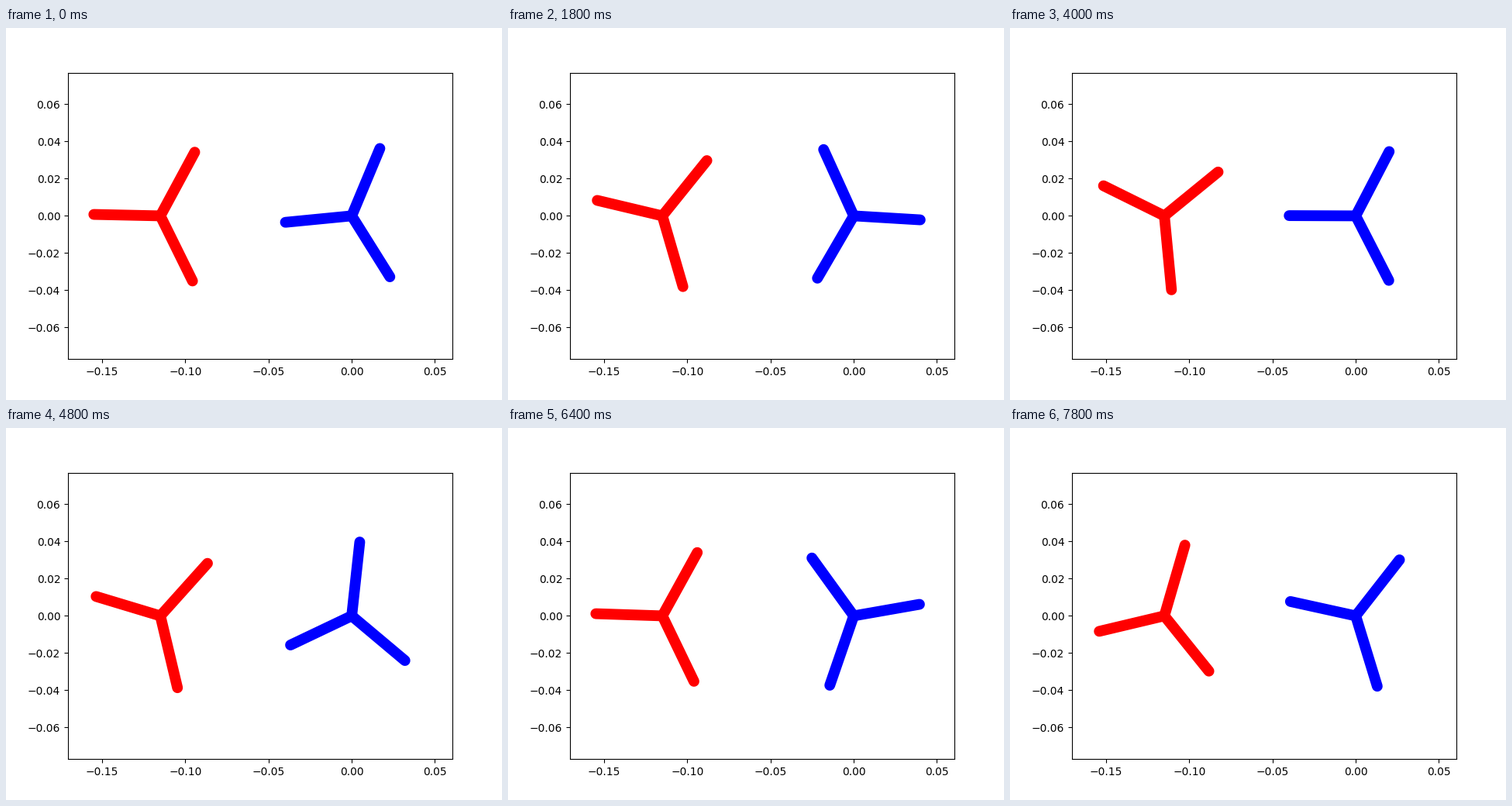
A matplotlib script that plays this animation: 640x480 px, repeating every 8 s.

```python
import numpy as np
import matplotlib.pyplot as plt
from matplotlib.animation import FuncAnimation

FRAMES = 40
INTERVAL = 200
ARM = 0.04
RED_X = -0.115

# Angle of the pushed rotor in degrees, one knot every STEP frames.
STEP = 3
KNOTS = np.array([58.9, 59.1, 54.8, 48.0, 41.5, 35.1, 33.6,
                  38.0, 44.9, 51.15, 56.0, 59.5, 63.6, 72.0])
SLOPES = np.gradient(KNOTS)


def red_angle(k):
    """Cubic Hermite curve through the knots."""
    i = min(k // STEP, len(KNOTS) - 2)
    s = k / STEP - i
    return ((1 + 2 * s) * (1 - s) ** 2 * KNOTS[i]
            + s * (1 - s) ** 2 * SLOPES[i]
            + s * s * (3 - 2 * s) * KNOTS[i + 1]
            + s * s * (s - 1) * SLOPES[i + 1])


def blue_angle(k):
    """Steady spin with a slight wobble each time an arm passes."""
    return 65.05 + 5.745 * k + 0.25 * np.sin(2 * np.pi * (k / 20.9 - 0.05))


fig, ax = plt.subplots(figsize=(6.4, 4.8), dpi=100)
ax.set_xlim(-0.1705, 0.0605)
ax.set_ylim(-0.077, 0.077)


def make_rotor(color):
    return [ax.plot([], [], color=color, lw=10, solid_capstyle="round")[0]
            for _ in range(3)]


def pose(arms, x, angle):
    for n, arm in enumerate(arms):
        a = np.radians(angle + 120 * n)
        arm.set_data([x, x + ARM * np.cos(a)], [0, ARM * np.sin(a)])


red = make_rotor("red")
blue = make_rotor("blue")


def update(k):
    pose(red, RED_X, red_angle(k))
    pose(blue, 0, blue_angle(k))
    return red + blue


anim = FuncAnimation(fig, update, frames=FRAMES, interval=INTERVAL,
                     init_func=lambda: update(0), repeat=True, repeat_delay=0)
plt.show()
```
